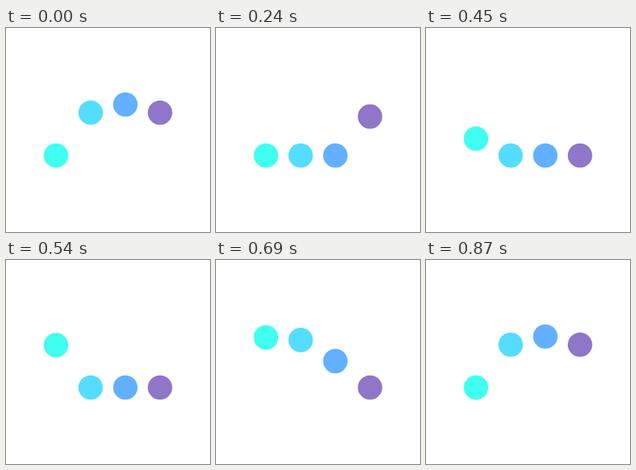
Recreate the animation shown at these times as an HTML page. Size 256 px wide and 256 px high, loop 900 ms.

```html
<!DOCTYPE html>
<html lang="en">
<head>
<meta charset="utf-8">
<title>Bouncing dots</title>
<style>
  html, body { margin: 0; width: 100%; height: 100%; overflow: hidden; background: #fff; }
  svg { display: block; width: 100%; height: 100%; }
</style>
</head>
<body>
<svg id="stage" viewBox="0 0 100 100"></svg>
<script>
const LOOP = 900, STEP = 30;
const PERIOD = LOOP - STEP; // the last step repeats the first pose
const FLOOR = 62.5, HEIGHT = 25;
const COLORS = ['#40fff0', '#55ddff', '#62b0ff', '#8f76c8'];

const stage = document.getElementById('stage');
const dots = COLORS.map((fill, i) => {
  const dot = document.createElementNS('http://www.w3.org/2000/svg', 'circle');
  dot.setAttribute('cx', 24.5 + 17 * i);
  dot.setAttribute('r', 6);
  dot.setAttribute('fill', fill);
  return stage.appendChild(dot);
});

// cubic-bezier(0, 0.5, 0.5, 1)
function easeOut(x) {
  let lo = 0, hi = 1;
  for (let i = 0; i < 24; i++) {
    const s = (lo + hi) / 2;
    if (1.5 * s * s - 0.5 * s ** 3 < x) lo = s; else hi = s;
  }
  return 1.5 * lo - 0.5 * lo ** 3;
}

// Up for a quarter of the period, mirrored down, then at rest for half.
function lift(phase) {
  return phase < 0.5 ? easeOut(1 - Math.abs(1 - phase * 4)) : 0;
}

function draw(ms) {
  const t = Math.floor((ms % LOOP) / STEP) * STEP;
  dots.forEach((dot, i) => {
    const phase = (t / PERIOD + 0.5 + (8 - i) / 8) % 1;
    dot.setAttribute('cy', FLOOR - HEIGHT * lift(phase));
  });
}

let start;
function tick(now) {
  start ??= now;
  draw(now - start);
  requestAnimationFrame(tick);
}
draw(0);
requestAnimationFrame(tick);
</script>
</body>
</html>
```
